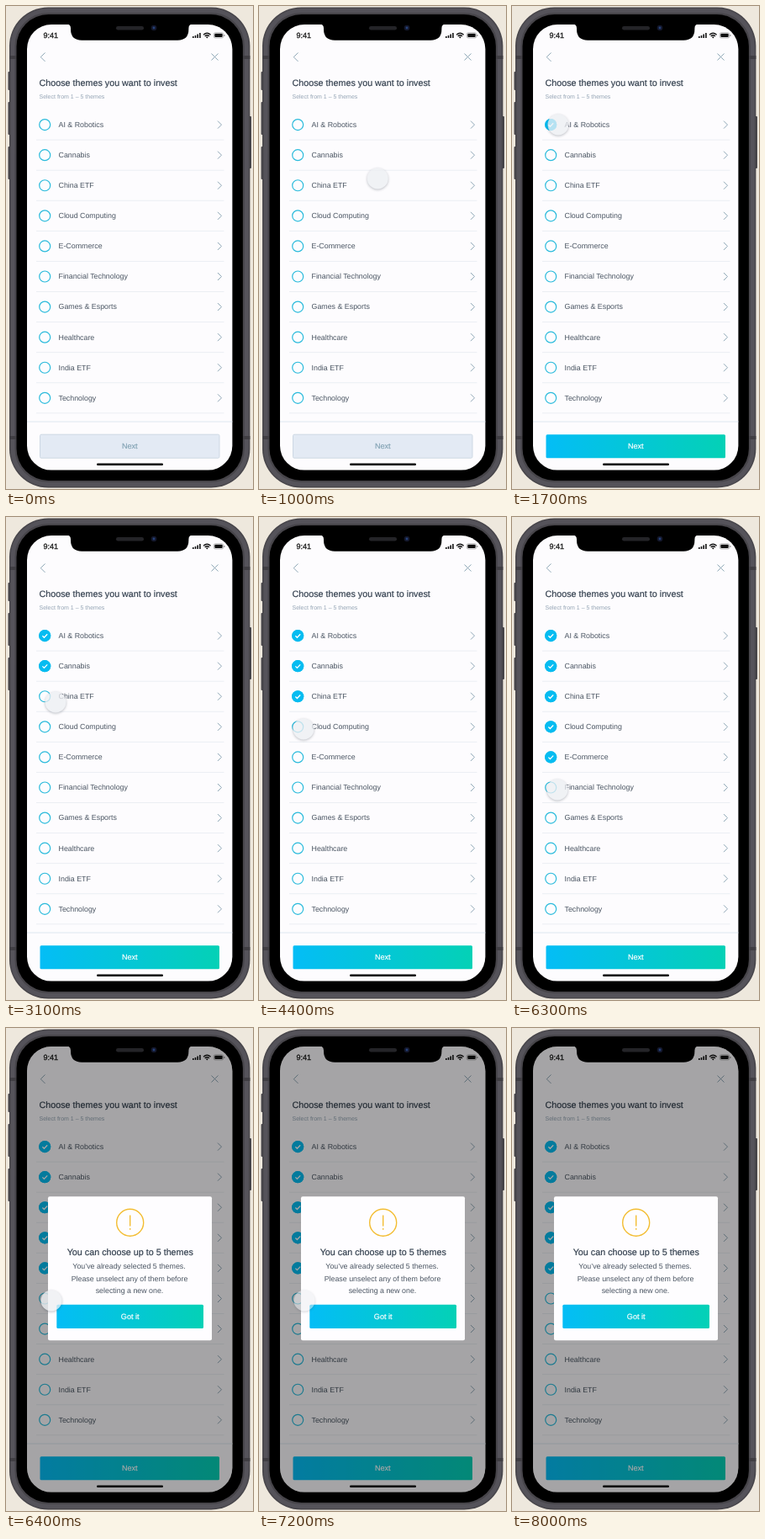
An HTML page that plays this animation: 294 by 574 pixels, repeating every 8100 ms.

```html
<!DOCTYPE html>
<html lang="en">
<head>
<meta charset="utf-8">
<style>
  html, body { margin: 0; width: 100%; height: 100%; overflow: hidden; background: #eee8dd; }
  svg { display: block; width: 294px; height: 574px; font-family: "Liberation Sans", Arial, sans-serif; }
  text { fill: #4a5562; font-size: 8.85px; text-rendering: geometricPrecision; }
  .medium { stroke: currentColor; stroke-width: .2; fill: currentColor; }
  .heading { font-size: 10.75px; color: #34404f; }
  .action { font-size: 9.1px; color: #fff; }
  .mid { text-anchor: middle; }
  .line { fill: none; stroke: #839dae; stroke-width: .9; }
  #cursor { filter: drop-shadow(0 1px 1.5px rgba(40, 50, 65, .4)); }
</style>
</head>
<body>
<svg viewBox="0 0 294 574">
  <defs>
    <linearGradient id="active"><stop stop-color="#04bdf6"/><stop offset="1" stop-color="#04d1b6"/></linearGradient>
    <clipPath id="screen"><rect x="25" y="22" width="244.4" height="529.6" rx="29"/></clipPath>
  </defs>

  <g fill="#47454a">
    <rect x="2.5" y="78" width="4" height="22" rx="1"/>
    <rect x="2.5" y="114" width="4" height="39" rx="1"/>
    <rect x="2.5" y="167" width="4" height="39" rx="1"/>
    <rect x="288" y="131" width="4" height="62" rx="1"/>
    <rect x="4" y="1.5" width="286.4" height="571" rx="46"/>
  </g>
  <rect x="8" y="5.5" width="278.4" height="563" rx="42" fill="none" stroke="#55535a" stroke-width="5"/>
  <path d="M4 61h9M281.4 61h9M4 513h9M281.4 513h9" stroke="#403e43" stroke-width="4"/>
  <rect x="12.5" y="10" width="269.4" height="554" rx="38"/>

  <g clip-path="url(#screen)">
    <rect x="25" y="21" width="245" height="531" fill="#fdfcfe"/>
    <text class="medium" x="44.5" y="38" style="font-size:9px;color:#222;stroke-width:.35">9:41</text>
    <path d="M222 36h1.6v2h-1.6zM224.7 35h1.6v3h-1.6zM227.4 33.5h1.6v4.5h-1.6zM230.1 32h1.6v6h-1.6z" fill="#111"/>
    <path d="M235 34.3q4.3-4 8.6 0M236.7 36q2.6-2.4 5.2 0" fill="none" stroke="#111" stroke-width="1.3"/>
    <circle cx="239.3" cy="37.3" r="1" fill="#111"/>
    <rect x="247.3" y="31.8" width="11.4" height="6.2" rx="1.8" fill="none" stroke="#888" stroke-width=".6"/>
    <rect x="248.3" y="32.8" width="9.4" height="4.2" rx="1" fill="#111"/>
    <path d="M259.9 34v2" stroke="#888"/>
    <path class="line" d="M46.5 55.5l-5.2 5.2 5.2 5.2M244.5 56.5l8 8M252.5 56.5l-8 8"/>
    <text class="medium heading" x="39.5" y="95">Choose themes you want to invest</text>
    <text x="39.5" y="110" style="font-size:7px;fill:#94a4b4">Select from 1 – 5 themes</text>
    <g id="rows"></g>
    <path d="M25 494h245" stroke="#dde7f0"/>
    <rect id="next" x="40.500" y="509.200" width="213.500" height="28" rx="1.500"/>
    <text id="nextLabel" class="medium action mid" x="147.3" y="526.2">Next</text>
    <rect x="108" y="543.5" width="79" height="2.6" rx="1.3"/>
    <g id="dialog">
      <rect x="25" y="21" width="245" height="531" opacity=".35"/>
      <rect x="50" y="200.3" width="195" height="171" rx="2" fill="#fefdff"/>
      <g fill="none" stroke="#f3bd32" stroke-width="1.4">
        <circle cx="147.7" cy="231.2" r="16"/>
        <path d="M147.7 222.5v13M147.7 238v1.8"/>
      </g>
      <text class="medium heading mid" x="147.8" y="269.6">You can choose up to 5 themes</text>
      <g class="mid">
        <text x="146.5" y="285.8">You’ve already selected 5 themes.</text>
        <text x="147" y="300.6">Please unselect any of them before</text>
        <text x="147" y="315.4">selecting a new one.</text>
      </g>
      <rect x="60.3" y="328.8" width="174.7" height="28.2" rx="1.5" fill="url(#active)"/>
      <text class="medium action mid" x="147.7" y="346.3">Got it</text>
    </g>
  </g>

  <path d="M72 21.500q5 0 5 5v1q0 13.200 13.200 13.200h114q13.200 0 13.200-13.200v-1q0-5 5-5z"/>
  <rect x="131" y="24" width="33" height="4.500" rx="2.200" fill="#242428"/>
  <circle cx="176" cy="26" r="3.300" fill="#14182c"/>
  <circle cx="176" cy="26" r="1.400" fill="#26427b"/>
  <circle id="cursor" r="12.500" fill="#edeff3"/>
</svg>
<script>
const LOOP = 8100, DIALOG_AT = 6350;
const themes = ['AI &amp; Robotics', 'Cannabis', 'China ETF', 'Cloud Computing', 'E-Commerce',
  'Financial Technology', 'Games &amp; Esports', 'Healthcare', 'India ETF', 'Technology'];
const selectAt = [1600, 2550, 3450, 4450, 5400];
// Cursor stops: time, x, y
const stops = [
  [300, 310, 330], [1450, 55, 141], [1850, 55, 141],
  [2350, 55, 179], [2700, 55, 179], [3100, 59, 220],
  [3350, 55, 216], [3650, 55, 216], [4250, 53, 252],
  [4600, 53, 252], [5150, 54, 288], [5550, 54, 288], [6150, 54, 324]
];
const $ = id => document.getElementById(id);

$('rows').innerHTML = themes.map((name, i) => `
  <g transform="translate(0 ${141.1 + 36.08 * i})">
    <circle cx="46.2" r="6.5" fill="none" stroke="#2abbdc" stroke-width="1.2"/>
    <g class="check"><circle cx="46.2" r="7.1" fill="#05bcf1"/>
      <path d="M43.4 .2l2 2 3.8-4" fill="none" stroke="#fff" stroke-width="1.3"/></g>
    <text x="62.5" y="2.9">${name}</text>
    <path class="line" d="M252 -4.5l4.5 4.5-4.5 4.5"/>
    <path d="M36 18h223.5" stroke="#ebeef3"/>
  </g>`).join('');
const checks = document.querySelectorAll('.check');

function cursorAt(t) {
  const k = stops.findIndex(s => s[0] > t);
  if (k < 1) return (k ? stops[stops.length - 1] : stops[0]).slice(1);
  const a = stops[k - 1], b = stops[k];
  const u = (t - a[0]) / (b[0] - a[0]), ease = u * u * (3 - 2 * u);
  return [1, 2].map(j => a[j] + (b[j] - a[j]) * ease);
}

function show(el, on) { el.style.display = on ? '' : 'none'; }

function draw() {
  const t = performance.now() % LOOP, enabled = t >= selectAt[0];
  checks.forEach((c, i) => show(c, t >= selectAt[i]));
  $('next').setAttribute('fill', enabled ? 'url(#active)' : '#e3eaf4');
  $('next').setAttribute('stroke', enabled ? 'none' : '#cdd8e3');
  $('nextLabel').style.color = enabled ? '#fff' : '#83a3b4';
  show($('dialog'), t >= DIALOG_AT);
  const fade = Math.min(1, Math.max(0, (7400 - t) / 300));
  $('cursor').setAttribute('transform', `translate(${cursorAt(t)})`);
  $('cursor').setAttribute('opacity', t < 300 ? 0 : .76 * fade);
  requestAnimationFrame(draw);
}
draw();
</script>
</body>
</html>
```
